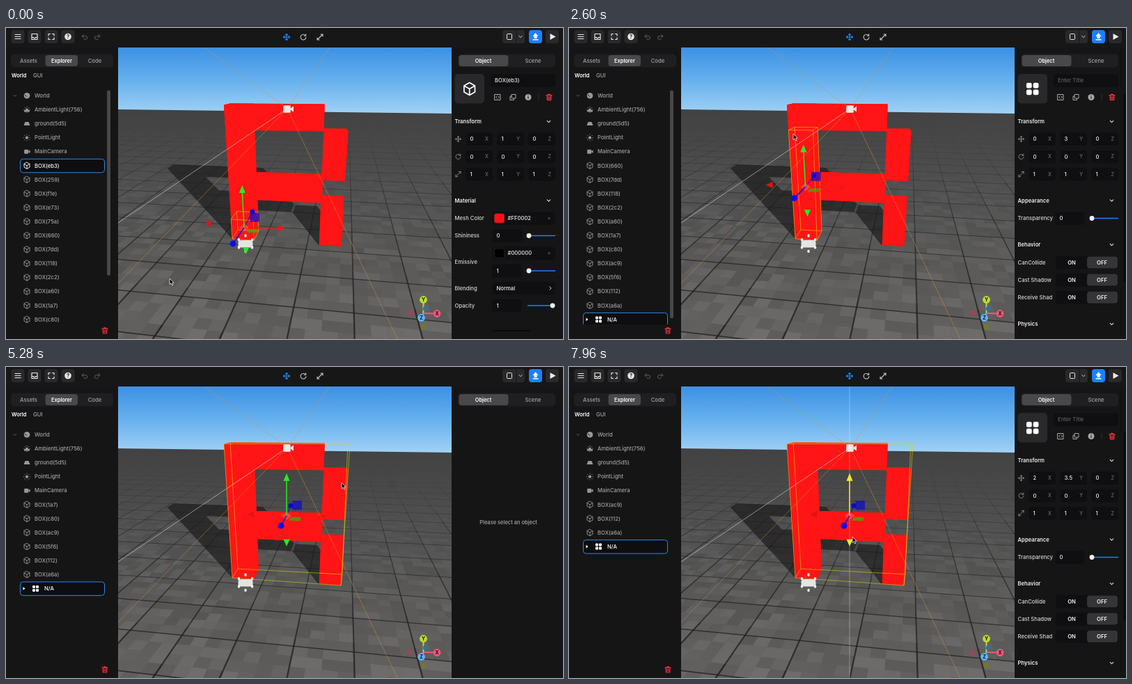
An HTML page with a canvas for the animation above (8 s loop, 800 by 447 pixels).

```html
<!DOCTYPE html>
<html lang="en">
<head>
<meta charset="utf-8">
<title>Scene editor</title>
<style>
html, body { margin: 0; width: 100%; height: 100%; overflow: hidden; background: #161617; }
canvas { display: block; width: 800px; height: 447px; }
</style>
</head>
<body>
<canvas id="stage"></canvas>
<script>
const LOOP = 8000, W = 800, H = 447;
const RED = '#ff1515', BLUE = '#1a80ff', PANEL = '#151516', FIELD = '#0f0f11', RAISED = '#29292b';
const GRAY = '#98989a', TEXT = '#a3a3a5', WHITE = '#f0f0f0';
const canvas = document.getElementById('stage');
const dpr = window.devicePixelRatio || 1;
canvas.width = W * dpr;
canvas.height = H * dpr;
let c = canvas.getContext('2d');

const listed = 'eb3 259 f1e e73 75a 660 7dd 118 2c2 a60 1a7 c80 ac9 5f6 112 a6a'.split(' ');
const clicked = listed.filter(n => !['ac9', '112', 'a6a'].includes(n));
const BEAT = 540, FIRST = 1480;
const clamp = (v, lo, hi) => Math.min(hi, Math.max(lo, v));
const mix = (a, b, p) => a + (b - a) * p;

// One more box joins the group on every beat; the centre follows from the count.
function stateAt(t) {
  const k = t < 880 ? 0 : t < FIRST ? 2 : Math.min(clicked.length, 3 + Math.floor((t - FIRST) / BEAT));
  const phase = t - FIRST - (k - 3) * BEAT;
  return {
    t, k,
    x: clamp((k - 6) / 2, 0, 2),
    y: k ? Math.min(3.5, 0.5 + k / 2) : 1,
    fresh: t < 1120,
    blank: (!k && t >= 800) || (k > 6 && k % 3 === 1 && phase < 80)
  };
}
// time, x, y of the pointer's stops
const stops = [
  [160, 235, 360], [760, 330, 260], [1040, 330, 260], [2600, 322, 152], [3640, 380, 138], [3720, 408, 144],
  [4180, 408, 144], [5260, 482, 166], [5800, 480, 200], [6340, 468, 268], [6520, 407, 244]
];
function pointerAt(t) {
  const i = stops.findIndex(s => s[0] > t);
  if (i < 1) return stops.at(i).slice(1);
  const [a, x1, y1] = stops[i - 1], [b, x2, y2] = stops[i];
  const p = (t - a) / (b - a), e = p * p * (3 - 2 * p);
  return [mix(x1, x2, e), mix(y1, y2, e)];
}

function trace(pts) {
  pts.forEach((p, i) => i ? c.lineTo(...p) : c.moveTo(...p));
  c.closePath();
}
function poly(pts, fill, stroke, lw = 1) {
  c.beginPath();
  trace(pts);
  if (fill) { c.fillStyle = fill; c.fill(); }
  if (stroke) { c.strokeStyle = stroke; c.lineWidth = lw; c.stroke(); }
}
function line([x1, y1], [x2, y2], color, lw = 1) {
  c.strokeStyle = color;
  c.lineWidth = lw;
  c.beginPath();
  c.moveTo(x1, y1);
  c.lineTo(x2, y2);
  c.stroke();
}
// Triangle with its tip at (x, y), pointing along (dx, dy).
function tip(x, y, dx, dy, size, half, fill) {
  const bx = x - dx * size, by = y - dy * size;
  poly([[x, y], [bx - dy * half, by + dx * half], [bx + dy * half, by - dx * half]], fill);
}
function dot(x, y, r, fill) {
  c.fillStyle = fill;
  c.beginPath();
  c.arc(x, y, r, 0, 7);
  c.fill();
}
function box(x, y, w, h, r, fill, stroke) {
  c.beginPath();
  c.roundRect(x, y, w, h, r);
  if (fill) { c.fillStyle = fill; c.fill(); }
  if (stroke) { c.strokeStyle = stroke; c.lineWidth = 1; c.stroke(); }
}
function text(s, x, y, color = TEXT, weight = 500, align = 'left', size = 7.7) {
  c.font = `${weight} ${size}px Inter, sans-serif`;
  c.textAlign = align;
  c.fillStyle = color;
  c.fillText(s, x, y + size * 0.36);
}

// Icons are drawn around their own centre.
const icons = {
  menu: 'M-4-3H4M-4 0H4M-4 3H4',
  inbox: 'M-4-4H4V4H-4ZM-4 1H-1.5L-1 2.2H1L1.5 1H4',
  expand: 'M-4-1.5V-4H-1.5M1.5-4H4V-1.5M4 1.5V4H1.5M-1.5 4H-4V1.5',
  undo: 'M-1.5-3.5L-4-1.2L-1.5 1M-4-1.2H1.5A2.2 2.2 0 0 1 1.5 3.2H-1',
  redo: 'M1.5-3.5L4-1.2L1.5 1M4-1.2H-1.5A2.2 2.2 0 0 0-1.5 3.2H1',
  move: 'M-4.5 0H4.5M0-4.5V4.5M-3-1.5L-4.5 0L-3 1.5M3-1.5L4.5 0L3 1.5M-1.5-3L0-4.5L1.5-3M-1.5 3L0 4.5L1.5 3',
  rotate: 'M3.2-2.2A3.9 3.9 0 1 0 3.9 .6M3.7-4.2V-1.8H1.3',
  scale: 'M-4 4L4-4M1-4H4V-1M-4 1V4H-1',
  down: 'M-2.3-1.1L0 1.1L2.3-1.1',
  right: 'M-1.1-2.3L1.1 0L-1.1 2.3',
  cube: 'M0-4.6L4-2.3V2.3L0 4.6L-4 2.3V-2.3ZM-4-2.3L0 0L4-2.3M0 0V4.6',
  trash: 'M-4-2.8H4M-1.4-2.8V-4.2H1.4V-2.8M-3-2.8L-2.6 4H2.6L3-2.8M-1-.8V2.2M1-.8V2.2',
  copy: 'M-1.5-4H4V1.5H-1.5ZM-2-1.5H-4V4H1.5V2',
  code: 'M-4-4H4V4H-4ZM-1-1.6L-2.5 0L-1 1.6M1-1.6L2.5 0L1 1.6',
  cross: 'M-1.2-1.2L1.2 1.2M1.2-1.2L-1.2 1.2'
};
for (const k in icons) icons[k] = new Path2D(icons[k]);

function icon(name, x, y, color, lw = 1, s = 1) {
  c.save();
  c.translate(x, y);
  c.scale(s, s);
  c.strokeStyle = color;
  c.lineWidth = lw / s;
  c.lineJoin = c.lineCap = 'round';
  c.stroke(icons[name]);
  c.restore();
}
function groupIcon(x, y, s) {
  for (const i of [-1, 1]) for (const j of [-1, 1])
    box(x + i * s - s * 0.8, y + j * s - s * 0.8, s * 1.6, s * 1.6, s * 0.45, '#fff');
}
function sun(x, y, r) {
  dot(x, y, r, GRAY);
  for (let a = 0; a < 6.2; a += Math.PI / 4) dot(x + Math.cos(a) * r * 2, y + Math.sin(a) * r * 2, 0.6, GRAY);
}
function camera(x, y, s, color) {
  box(x - 5.5 * s, y - 5 * s, 10 * s, 10 * s, 1.5 * s, color);
  tip(x + 3.5 * s, y, -1, 0, 5 * s, 4 * s, color);
}

// Ground point in perspective; one unit is one box.
function ground(x, z) {
  const a = -0.0093 * x, b = 0.054 * z, w = 1 + a + b;
  return [(325 - 2870 * a + 490 * b) / w, (303 + 79 * a + 40 * b) / w];
}
// Point on the front (0) or back (1) plane of the letter, in boxes from its top left.
const planes = [
  [[313, 110.5], [494, 110.5], [481, 314], [325, 303]],
  [[322, 108.5], [491, 109.5], [483, 298], [333, 290]]
];
function spot(side, col, row) {
  const q = planes[side], u = col / 5, v = row / 6, w = v * (1.15 - 0.15 * v);
  return [0, 1].map(i => mix(mix(q[0][i], q[1][i], u), mix(q[3][i], q[2][i], u), w));
}
const corners = (x0, y0, x1, y1) => [[x0, y0], [x1, y0], [x1, y1], [x0, y1]];
// column and row ranges of the bars that form the letter
const bars = [[0, 0, 1, 6], [0, 0, 4, 1], [0, 3, 4, 4], [4, 1, 5, 3], [4, 4, 5, 6]].map(b => corners(...b));

function prism(pts, fill, stroke) {
  const [front, back] = [0, 1].map(s => pts.map(p => spot(s, ...p)));
  poly(back, fill, stroke, 0.8);
  pts.forEach((p, i) => {
    const j = (i + 1) % 4;
    if (fill) poly([front[i], front[j], back[j], back[i]], fill);
    else line(front[i], back[i], stroke, 0.8);
  });
  poly(front, fill, stroke, 0.8);
}

function paintWorld() {
  const fade = (y0, y1, colors) => {
    const g = c.createLinearGradient(0, y0, 0, y1);
    colors.forEach((s, i) => g.addColorStop(i / (colors.length - 1), s));
    return g;
  };
  const land = [[161, 117], [640, 123], [640, 447], [161, 447]];
  c.fillStyle = fade(28, 122, ['#3c91e3', '#66b0ee', '#9fd1f5']);
  c.fillRect(161, 28, 479, 100);
  c.save();
  poly(land, fade(117, 447, ['#424242', '#505050', '#5b5a59', '#646260']));
  c.clip();

  let seed = 7;
  const random = () => (seed = seed * 16807 % 2147483647) / 2147483647;
  for (let z = -8; z < 14; z += 0.5) for (let x = -14; x < 20; x += 0.5) {
    const v = random() - 0.5, alpha = Math.abs(v) * 0.11 * (16 - z) / 16;
    poly(corners(x, z, x + 0.5, z + 0.5).map(p => ground(...p)), `rgba(${v > 0 ? '255,250,245' : '0,0,0'},${alpha})`);
  }
  const seam = (p, q, far) =>
    line(p, q, `rgba(28,28,28,${Math.max(0.06, 0.6 - far * 0.023)})`, Math.max(0.5, (p[1] - 60) / 170));
  for (let n = -24.5; n < 30; n += 2) {
    for (let z = -8; z < 30; z += 2) seam(ground(n, z), ground(n, z + 2), z);
    if (n > -9) seam(ground(-30, n), ground(34, n), n);
  }

  // Cast shadow: each bar leans away from the lamp with its height.
  const cast = (col, row, z) => {
    const h = 6 - row;
    return ground(col + h * (0.14 * col - 1.4), z + h * 1.77);
  };
  c.beginPath();
  for (const b of bars) for (let z = 0; z <= 1; z += 0.2) trace(b.map(p => cast(...p, z)));
  c.fillStyle = 'rgba(22,22,22,.62)';
  c.fill();
  c.restore();

  bars.forEach(b => prism(b, RED));
  for (const [x, y] of [[285, 28], [465, 28], [562, 447], [161, 367]])
    line([404, 116], [x, y], 'rgba(214,146,52,.6)', 0.8);
  line([404, 116], [161, 280], 'rgba(225,225,225,.7)', 0.8);
}
const world = document.createElement('canvas');
world.width = W * dpr;
world.height = H * dpr;
{
  const main = c;
  c = world.getContext('2d');
  c.scale(dpr, dpr);
  paintWorld();
  c = main;
}

function gizmo({ t, x: X, y: Y }) {
  const active = t >= 7660;
  const x = 339 + X * 32 + (3.5 - Y) * 1.2, y = 287 - (Y - 1) * 29.3;
  const green = active ? '#f4ea2a' : '#22ee22';
  const lean = (x - 403) * 0.045, depth = 23 - (Y - 1) * 3.4, drop = 42 + (Y - 1) * 2.4;
  const back = [x + 12 - X * 3, y - depth], front = [x - 16 + X * 4, y + depth];
  if (active) line([403, 28], [403, 447], 'rgba(255,255,255,.4)', 0.8);
  line([x, y], [x + 53, y + 0.5], '#f01818', 1.3);
  tip(x + 58, y + 0.5, 1, 0, 9, 4.5, '#f51414');
  tip(x - 57, y - 6 + (Y - 1) * 1.6, -1, 0, 10, 4.5, '#e01414');
  line([x, y], back, '#1010d0');
  dot(...back, 3.5, '#0808d8');
  box(x + 8.5, y - 21.5, 13.5, 13, 0, 'rgba(18,10,205,.72)');
  poly([[x + 6, y + 2], [x + 21, y + 2], [x + 19, y + 7.5], [x + 3, y + 7]], 'rgba(70,170,0,.72)');
  poly([[x, y - 6], [x + 7, y], [x, y + 6], [x - 7, y]], 'rgba(255,120,110,.45)');
  line([x, y], [x + lean, y - 52], green, 1.5);
  tip(x + lean, y - 61, 0, -1, 11, 4.5, green);
  tip(x - lean, y + drop - 4, 0, -1, -10, 4.5, green);
  line([x, y], front, '#1212f0', 1.5);
  dot(...front, 4.4, '#0a0af5');
}
function sceneIcons() {
  camera(404, 116.5, 1.05, '#e9e9e9');
  box(333.5, 305, 21, 10.5, 4, '#e4e4e4');
  for (let a = Math.PI / 6; a < 6.2; a += Math.PI / 3)
    box(342.4 + Math.cos(a) * 11, 307.5 + Math.sin(a) * 11.2, 3.2, 4.4, 1.5, '#f2f2f2');
}
function axes() {
  const at = [599.5, 410];
  const ends = [['Y', 0, -19.5, '#b9dc32', '#6f7a2c'], ['X', 19.5, 0.5, '#f3567a', '#9b4658'], ['Z', -3, 6.5, '#5bb4f5', '#3b6f94']];
  for (const [, dx, dy, color, dim] of ends) {
    dot(at[0] - dx, at[1] - dy, 3.8, dim);
    line(at, [at[0] + dx, at[1] + dy], color, 2);
  }
  for (const [name, dx, dy, color] of ends) {
    dot(at[0] + dx, at[1] + dy, 5.4, color);
    text(name, at[0] + dx, at[1] + dy, '#151515', 700, 'center', 7);
  }
}

function topBar() {
  box(0, 0, W, 28, 0, '#171718');
  const button = (x, fill = RAISED, w = 19) => box(x - 9.5, 3, w, 19, 4, fill);
  [17, 41, 65, 89].forEach(x => button(x));
  ['menu', 'inbox', 'expand'].forEach((n, i) => icon(n, 17 + i * 24, 12.5, '#e8e8e8', 1.2));
  dot(89, 12.5, 4.8, '#e8e8e8');
  text('?', 89, 12.5, '#222', 700, 'center', 7.5);
  ['undo', 'redo'].forEach((n, i) => icon(n, 113 + i * 18, 13, '#5c5c5e'));
  ['move', 'rotate', 'scale'].forEach((n, i) => icon(n, 403 + i * 24, 13, i ? '#c4c4c6' : '#2088ff', 1.1));
  button(722.5, RAISED, 32);
  line([733, 3], [733, 22], '#171718');
  box(719.5, 8.5, 7, 8, 1, null, '#e8e8e8');
  icon('down', 739, 12.5, '#c8c8c8');
  button(760.5, BLUE);
  tip(760.5, 7, 0, -1, 5, 4, '#fff');
  box(758.5, 11, 4, 4, 0, '#fff');
  box(756.5, 16, 8, 1.5, 0, '#fff');
  button(784.5);
  tip(789.5, 12.5, 1, 0, 8, 4.5, '#eee');
}
// Tabs with one raised: the pill spans from x to x + w.
function tabs(x, w, names, pill) {
  box(x, 37.5, w, 19, 5, '#1f1f21');
  box(pill[0], 39, pill[1], 16, 4, '#48484b');
  for (const [s, cx] of names) {
    const on = cx > pill[0] && cx < pill[0] + pill[1];
    text(s, cx, 47, on ? '#fff' : TEXT, on ? 600 : 500, 'center', on ? 7.4 : 7.7);
  }
}
function leftPanel({ k }) {
  box(0, 28, 161, H - 28, 0, PANEL);
  tabs(7, 147, [['Assets', 32.5], ['Explorer', 80], ['Code', 127.5]], [56.5, 46.5]);
  text('World', 8, 68.5, '#fff', 600, 'left', 7.4);
  text('GUI', 39, 68.5);

  const gone = clicked.slice(0, k), left = listed.filter(n => !gone.includes(n));
  const rows = 5 + left.length + (k ? 1 : 0), y = i => 97.3 + i * 20.1;
  const outline = ry => box(20.5, ry - 9.5, 121, 19.5, 4, '#0e0e10', '#2f86e2');
  c.save();
  c.beginPath();
  c.rect(0, 86, 161, 340);
  c.clip();
  icon('down', 13, y(0), '#707072', 0.8, 0.8);
  dot(30, y(0), 4.3, GRAY);
  line([27, y(0) - 1.5], [30, y(0) + 1.5], PANEL);
  sun(30, y(1), 2);
  box(26, y(1) + 0.5, 8, 2.5, 1, GRAY);
  poly([[27.5, y(2) - 2.5], [32.5, y(2) - 2.5], [34.5, y(2) + 2.5], [25.5, y(2) + 2.5]], GRAY);
  sun(30, y(3), 2.2);
  camera(29.5, y(4), 0.6, GRAY);
  ['World', 'AmbientLight(756)', 'ground(5d5)', 'PointLight', 'MainCamera'].forEach((s, i) => text(s, 41, y(i)));
  left.forEach((n, i) => {
    const ry = y(i + 5), on = !k && !i;
    if (on) outline(ry);
    icon('cube', 30, ry, on ? '#fff' : GRAY, 0.9);
    text(`BOX(${n})`, 41, ry, on ? '#fff' : TEXT);
  });
  if (k) {
    const ry = y(rows - 1);
    outline(ry);
    tip(27.5, ry, 1, 0, 3, 2.3, '#fff');
    groupIcon(42.5, ry, 2.5);
    text('N/A', 55, ry, '#fff');
  }
  c.restore();
  const bar = 338 * 338 / (rows * 20.1 + 7);
  if (bar < 338) box(145, 89.5, 5, bar, 2.5, '#48484a');
  icon('trash', 142, 435, '#f0323c', 1.2);
}

function heading(s, y) {
  text(s, 644.5, y, WHITE, 600);
  icon('down', 779.5, y, '#e0e0e0', 1.1);
}
function label(s, y) {
  text(s, 644.5, y, '#d6d6d8');
}
function field(x, y, w, value, unit = '', color = WHITE) {
  box(x, y - 9.2, w, 18.5, 3.5, FIELD);
  text(value, x + 6, y, color);
  text(unit, x + w - 6, y, '#6c6c6f', 500, 'right', 7);
}
function slider(y, value, knob = 751) {
  field(698.5, y, 42, value);
  line([749, y], [789, y], BLUE, 1.5);
  dot(knob, y, 3.4, '#f2f2f2');
}
function swatch(y, color, name) {
  field(698.5, y, 90, '');
  box(701, y - 7, 15, 14, 3, color, '#262628');
  text(name, 720.5, y, WHITE);
  icon('cross', 780, y, '#77777a', 0.8);
}
function material() {
  heading('Material', 248);
  ['Mesh Color', 'Shininess'].forEach((s, i) => label(s, 273.5 + i * 25));
  swatch(273.5, '#ff1015', '#FF0002');
  slider(298.5, '0');
  label('Emissive', 336.5);
  swatch(323.7, '#000', '#000000');
  slider(349, '1');
  label('Blending', 374);
  field(698.5, 374, 90, 'Normal');
  icon('right', 782, 374, '#d0d0d2');
  label('Opacity', 399);
  slider(399, '1', 785);
  line([699, 435], [753, 435], '#0b0b0c', 2);
}
function groupOptions() {
  heading('Appearance', 248);
  label('Transparency', 273.5);
  slider(273.5, '0');
  heading('Behavior', 311.5);
  ['CanCollide', 'Cast Shadow', 'Receive Shad'].forEach((s, i) => {
    const y = 337 + i * 25.1;
    label(s, y);
    box(699, y - 9.2, 90, 18.5, 4, FIELD);
    box(744, y - 8.5, 44, 17, 4, '#353537');
    text('ON', 722, y, WHITE, 600, 'center');
    text('OFF', 765.5, y, WHITE, 600, 'center');
  });
  heading('Physics', 425.5);
  box(796.5, 94, 3, 271, 1.5, '#0a0a0b');
}
function rightPanel({ k, x, y, fresh, blank }) {
  box(640, 28, 160, H - 28, 0, PANEL);
  tabs(649, 140, [['Object', 685.5], ['Scene', 757]], [650.5, 71]);
  if (blank) return text('Please select an object', 721.5, 223, '#a8a8aa', 500, 'center', 7.5);

  box(644.5, 66, 42.5, 42.5, 5, RAISED);
  if (k) groupIcon(665.7, 87.5, 4.9);
  else icon('cube', 665.7, 87.5, '#fff', 1.7, 1.95);
  field(696, 75.5, 93, fresh ? 'BOX(eb3)' : 'Enter Title', '', fresh ? '#e8e8e8' : '#5f5f62');
  ['code', 'copy'].forEach((n, i) => icon(n, 706 + i * 22, 99.5, '#a8a8aa'));
  dot(750, 99.5, 4.5, '#a8a8aa');
  text('i', 750, 99.5, PANEL, 700, 'center', 7);
  line([765, 95], [765, 104], '#303032');
  icon('trash', 780, 99.5, '#f0323c', 1.3);

  heading('Transform', 134.5);
  const values = [[x, k && fresh ? -0.5 : y, 0], [0, 0, 0], [1, 1, 1]];
  ['move', 'rotate', 'scale'].forEach((n, i) => {
    const ry = 159.7 + i * 25.2;
    icon(n, 649.5, ry, '#909092', 0.9, 0.9);
    values[i].forEach((v, j) => field(660.5 + j * 45, ry, 38.5, String(v), 'XYZ'[j]));
  });
  if (k) groupOptions();
  else material();
}
const arrow = new Path2D('M0 0V8.6L2 6.8L3.5 10L5 9.3L3.6 6.2L6.2 6.1Z');
function drawPointer(t) {
  c.save();
  c.translate(...pointerAt(t));
  c.fillStyle = '#050505';
  c.strokeStyle = '#f4f4f4';
  c.lineWidth = 0.8;
  c.fill(arrow);
  c.stroke(arrow);
  c.restore();
}

function frame(now) {
  const s = stateAt(now % LOOP);
  c.setTransform(dpr, 0, 0, dpr, 0, 0);
  c.drawImage(world, 0, 0, W, H);
  prism(corners(0, 6 - clamp(s.k, 1, 6), 2 * s.x + 1, 6), null, 'rgba(222,208,20,.7)');
  sceneIcons();
  gizmo(s);
  axes();
  topBar();
  leftPanel(s);
  rightPanel(s);
  drawPointer(s.t);
  requestAnimationFrame(() => frame(performance.now() - start));
}
const start = performance.now();
frame(0);
</script>
</body>
</html>
```
